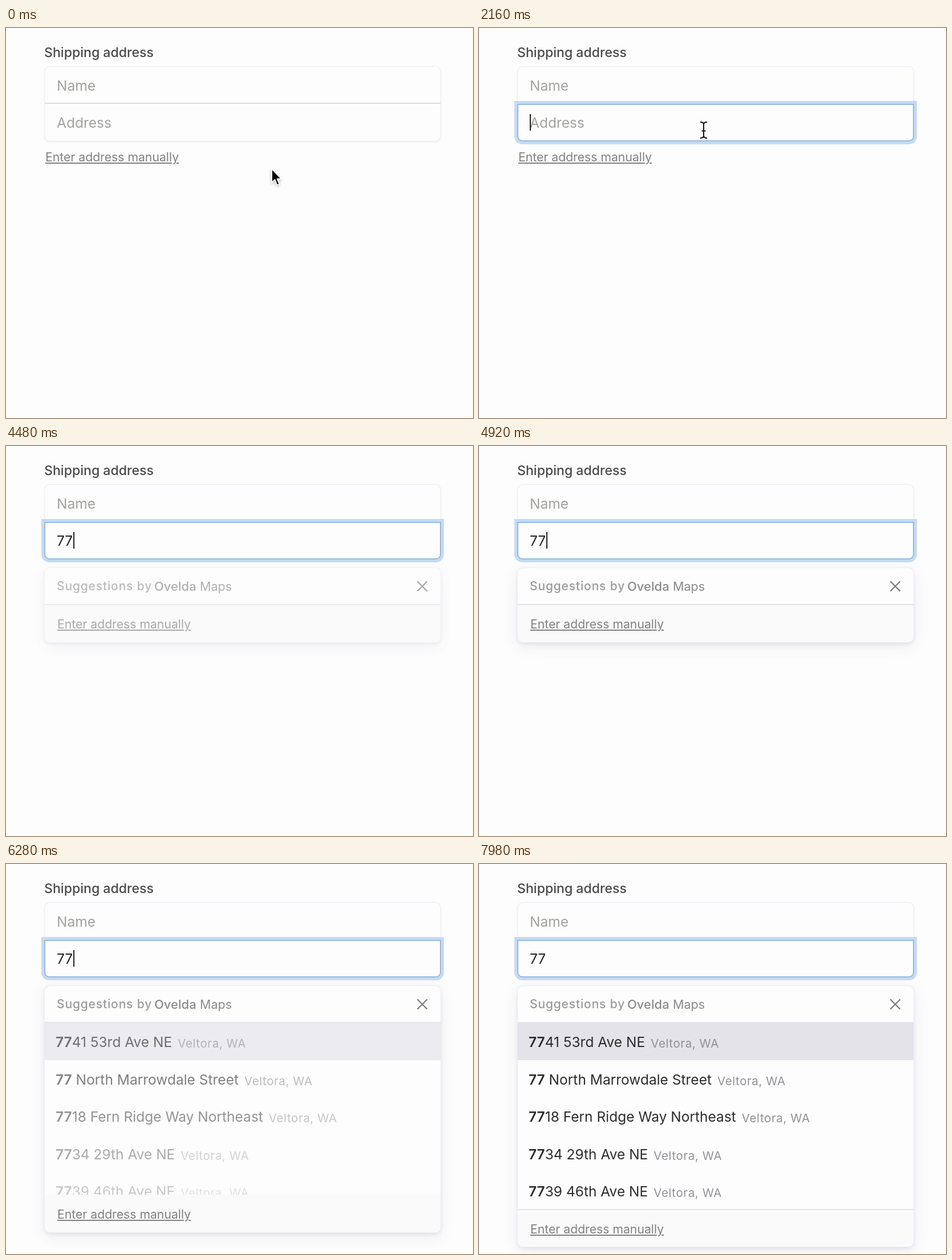
These frames come from a looping animation (819x684 px, 8 s). An HTML page:

```html
<!DOCTYPE html>
<html lang="en">
<head>
<meta charset="utf-8">
<title>Shipping address</title>
<style>
  html, body { margin: 0; width: 100%; height: 100%; overflow: hidden; background: #fdfdfd; }
  #stage {
    position: relative; width: 819px; height: 684px; overflow: hidden;
    font-family: Inter, "Liberation Sans", sans-serif; font-optical-sizing: none;
  }
  #stage div, #stage svg { position: absolute; box-sizing: border-box; }
  /* Zero line height: top is the middle of the capitals. */
  .text { line-height: 0; white-space: pre; }
  .big { font-size: 24.5px; }
  .hint { color: #a2a29e; }
  .link {
    font-size: 21.2px; color: #818181; text-decoration: underline;
    text-decoration-thickness: 1.5px; text-underline-offset: 2px;
  }
  #form {
    left: 68px; top: 68px; width: 694px; height: 130px; border-radius: 9px;
    box-shadow: 0 0 0 1px #ebebf4, 0 2px 4px rgba(50, 50, 93, .09);
  }
  #split { left: 68px; top: 131px; width: 694px; height: 1.5px; background: #dcded6; }
  #focus {
    left: 67px; top: 133px; width: 696px; height: 66px;
    border: 2px solid #98bae2; border-radius: 0 0 9px 9px;
    background: #fdfdfd; box-shadow: 0 0 0 5px #c4dbf4;
  }
  #caret { top: 151px; width: 2px; height: 29px; background: #222; }
  #panel {
    left: 68px; top: 214px; width: 694px; border-radius: 9px; background: #fdfdfd;
    box-shadow: 0 0 0 1px #ececf5, 0 7px 28px rgba(60, 55, 110, .09), 0 3px 7px rgba(60, 55, 110, .1);
  }
  #list { left: 0; top: 64px; width: 694px; overflow: hidden; }
  .row { left: 0; width: 694px; height: 66px; }
  .row .text { left: 19px; top: 34px; color: #2c2c2e; font-size: 24.5px; }
  .row b { font-weight: 600; }
  .row span { margin-left: 10px; color: #909096; font-size: 20.5px; letter-spacing: .6px; position: relative; top: 1px; }
  #footer { left: 0; width: 694px; height: 66px; background: #fafafb; border-radius: 0 0 9px 9px; }
  .line { left: 0; width: 694px; height: 1.5px; background: #e4e4ea; }
  svg { overflow: visible; fill: none; }
</style>
</head>
<body>
<div id="stage">
  <div class="text" style="left:67px;top:43px;font-size:23.1px;font-weight:500;color:#4a4a4c">Shipping address</div>
  <div id="form"></div>
  <div id="split"></div>
  <div class="text big hint" style="left:89px;top:101px">Name</div>
  <div class="text link" id="manual" style="left:69px;top:226px">Enter address manually</div>

  <div id="panel">
    <div class="text" style="left:21px;top:32px;font-size:21px;font-weight:500;letter-spacing:.85px;color:#9a9a9a">Suggestions by</div>
    <div class="text" style="left:192px;top:32px;font-size:22px;font-weight:500;color:#8b8b8b">Ovelda</div>
    <div class="text" style="left:272px;top:32px;font-size:21.5px;color:#8b8b8b">Maps</div>
    <svg style="left:653px;top:23px" width="18" height="18" stroke="#808080" stroke-width="2.4" stroke-linecap="round">
      <path d="M1 1L17 17M17 1L1 17"/>
    </svg>
    <div id="list"></div>
    <div id="footer">
      <div class="line" id="rule"></div>
      <div class="text link" style="left:22px;top:34.5px">Enter address manually</div>
    </div>
    <div class="line" style="top:63px"></div>
  </div>

  <div id="focus"></div>
  <div class="text big" id="value" style="left:89px;top:166px"></div>
  <div id="caret"></div>

  <svg id="arrow" width="20" height="30" style="left:0;top:0;filter:drop-shadow(0 2px 2px rgba(0,0,0,.25))">
    <path d="M0 0V24L5.5 19L9.5 28.5L13.5 26.8L9.6 17.6H17Z" fill="#000" stroke="#fff" stroke-width="1.8"/>
  </svg>
  <svg id="beam" width="14" height="30" style="left:0;top:0">
    <g id="beamShape">
      <path id="beamPath" d="M-6-14Q0-14 0-10Q0-14 6-14M0-10V10M-6 14Q0 14 0 10Q0 14 6 14M-3.5 1.5H3.5"/>
    </g>
  </svg>
</div>
<script>
const LOOP = 8000;
const MOVE = [850, 1580], FOCUS = 1850, KEYS = [3400, 4200], OPEN = 4380, EXPAND = 5800;
const BLINK = 2000, GROWTH = 328;
const ROWS = ["41 53rd Ave NE", " North Marrowdale Street", "18 Fern Ridge Way Northeast",
              "34 29th Ave NE", "39 46th Ave NE"];

const $ = id => document.getElementById(id);
const clamp = x => Math.min(1, Math.max(0, x));
const settle = (dt, tau) => dt <= 0 ? 0 : 1 - Math.exp(-dt / tau);
const spring = (dt, rate) => dt <= 0 ? 0 : 1 - (1 + dt * rate) * Math.exp(-dt * rate);
const smooth = x => x * x * (3 - 2 * x);
const show = (el, on) => { el.style.visibility = on ? "visible" : "hidden"; };

const rows = ROWS.map((rest, i) => {
  const row = document.createElement("div");
  row.className = "row";
  row.style.top = i * 65.6 + "px";
  if (!i) row.style.background = "#e4e3ea";
  row.innerHTML = `<div class="text"><b>77</b>${rest}<span>Veltora, WA</span></div>`;
  $("list").append(row);
  return row;
});

// White outline under the black text pointer.
const outline = $("beamPath").cloneNode();
outline.removeAttribute("id");
$("beamShape").prepend(outline);
outline.setAttribute("stroke", "#fff");
outline.setAttribute("stroke-width", 4);
$("beamPath").setAttribute("stroke", "#111");
$("beamPath").setAttribute("stroke-width", 2);

function drawPointer(t) {
  const k = smooth(clamp((t - MOVE[0]) / (MOVE[1] - MOVE[0])));
  const x = 466 - 72 * k, y = 247 - 68 * k;
  const inField = y < 198;
  $("arrow").style.transform = $("beam").style.transform = `translate(${x}px, ${y}px)`;
  show($("arrow"), !inField);
  show($("beam"), inField && t < KEYS[0]);
}

function drawField(t) {
  const typed = KEYS.filter(k => t >= k).length;
  const focused = t >= FOCUS;
  const since = t - (typed ? KEYS[typed - 1] : FOCUS);
  const value = $("value");
  value.textContent = typed ? "7".repeat(typed) : "Address";
  value.style.color = typed ? "#242424" : "#a2a29e";
  $("focus").style.opacity = settle(t - FOCUS, 70);
  $("caret").style.left = [89, 103.5, 118][typed] + "px";
  show($("caret"), focused && since % BLINK < BLINK / 2);
}

function drawPanel(t) {
  const grow = GROWTH * spring(t - EXPAND, 0.0087);
  const panel = $("panel");
  show($("manual"), t < OPEN);
  panel.style.opacity = settle(t - OPEN, 90);
  panel.style.height = 129.5 + grow + "px";
  $("list").style.height = grow + "px";
  $("footer").style.top = 63.5 + grow + "px";
  $("rule").style.opacity = smooth(clamp((t - 6350) / 600));
  rows.forEach((row, i) => { row.style.opacity = settle(t - EXPAND - i * 90, 430); });
}

function frame() {
  const t = performance.now() % LOOP;
  drawPointer(t);
  drawField(t);
  drawPanel(t);
  requestAnimationFrame(frame);
}
frame();
</script>
</body>
</html>
```
